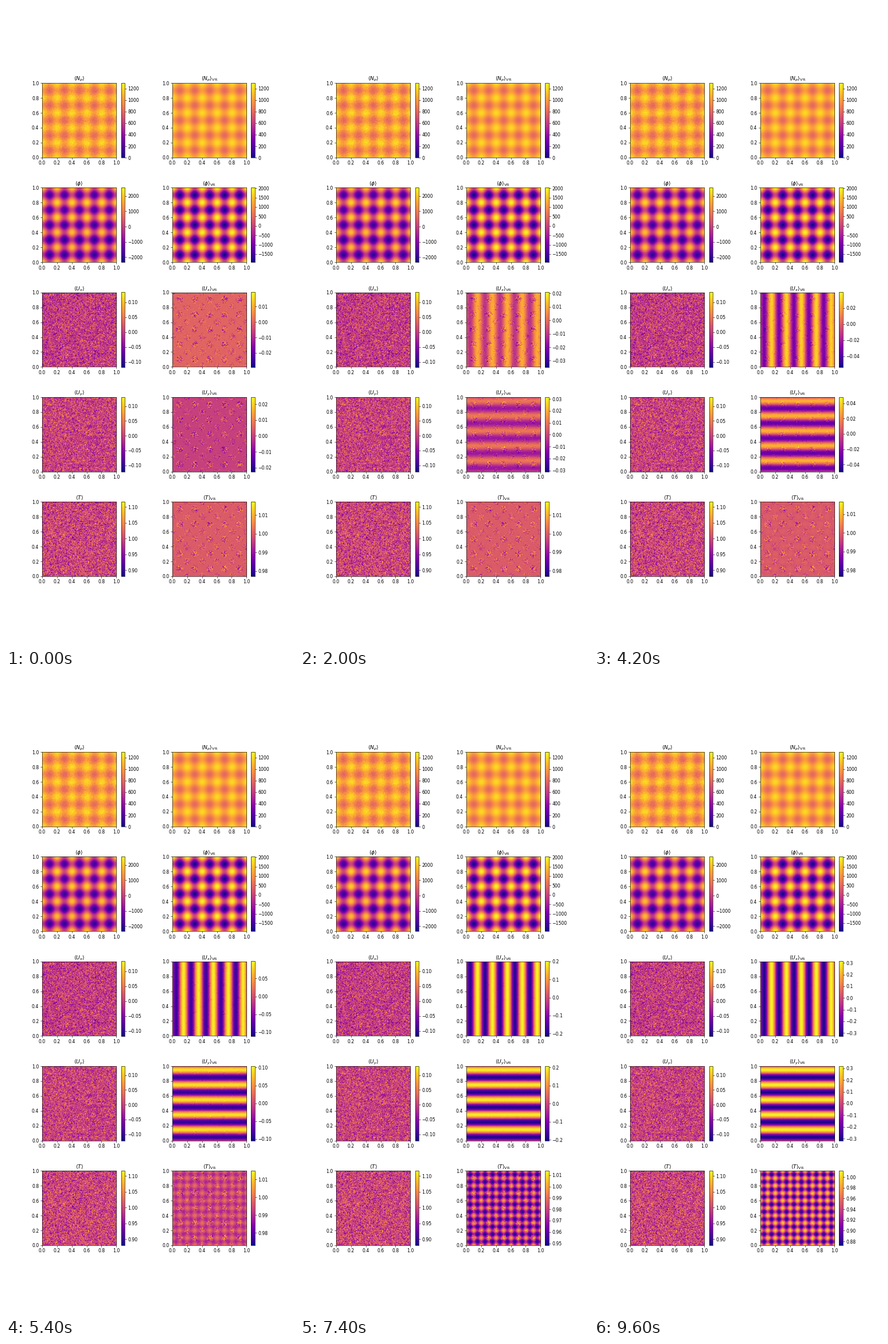
Recreate the animation shown at these times as a matplotlib script. Size 502 by 1116 pixels, loop 9.8 s.

```python
import numpy as np
import matplotlib.pyplot as plt
from matplotlib.animation import FuncAnimation

WIDTH, HEIGHT, DPI = 502, 1116, 55.8
FRAMES, INTERVAL = 49, 200
N = 100

plt.rcParams.update({"font.family": "DejaVu Sans", "font.size": 10})
rng = np.random.default_rng(7)

centres = (np.arange(N) + 0.5) / N
X, Y = np.meshgrid(centres, centres)
wave = np.cos(10 * np.pi * X) + np.cos(10 * np.pi * Y)
sin_x, sin_y = np.sin(10 * np.pi * X), np.sin(10 * np.pi * Y)
density = 1000 + 100 * wave


def noise():
    return rng.standard_normal((N, N))


def stretch(values, low, high):
    """Scale both tails so that the values span exactly low to high."""
    return np.where(values < 0, values * low / values.min(),
                    values * high / values.max())


def smoothstep(values, start, stop):
    u = np.clip((values - start) / (stop - start), 0, 1)
    return u * u * (3 - 2 * u)


def sim_time(i):
    """Fine steps first, ten times coarser ones later."""
    return 0.001 * i if i <= 20 else 0.02 + 0.01 * (i - 20)


# Variance-reduced noise gathers where density is far from its mean
spots = 0.06 + smoothstep(abs(wave) / 2, 0.3, 0.75) * np.where(wave < 0, 1, 0.6)


class PlainAverage:
    """Thermal noise whose cells change value one by one as time goes on."""

    def __init__(self, mean, low, high):
        self.early = mean + stretch(noise(), low, high)
        self.late = mean + 0.032 * noise()
        self.switch = rng.uniform(0.008, 3, (N, N))
        self.limits = mean + low, mean + high

    def __call__(self, t):
        return np.where(t > self.switch, self.late, self.early), self.limits


class ReducedAverage:
    """Mean flow plus fixed noise, with limits that follow the data."""

    def __init__(self, mean, low, high):
        self.mean = mean
        self.noise = stretch(spots * noise(), low, high)

    def __call__(self, t):
        data = self.mean(t) + self.noise
        return data, (data.min(), data.max())


def static(data, low, high):
    return lambda t: (data, (low, high))


def speed(t):
    return 1.04 * t


def temperature(t):
    return 1 - 2 / 3 * speed(t) ** 2 * (sin_x**2 + sin_y**2)


columns = [
    [
        static(density + np.sqrt(density) * noise(), 0, 1297),
        static(1000 * wave - 160 * np.sin(2 * np.pi * Y), -2336, 2547),
        PlainAverage(0, -0.1177, 0.1336),
        PlainAverage(0, -0.1220, 0.1310),
        PlainAverage(1, -0.1200, 0.1170),
    ],
    [
        static(density, 0, 1297),
        static(985 * wave + 45, -1942, 2031),
        ReducedAverage(lambda t: -speed(t) * sin_x, -0.0292, 0.0193),
        ReducedAverage(lambda t: -speed(t) * sin_y, -0.0227, 0.0246),
        ReducedAverage(temperature, -0.0230, 0.0172),
    ],
]
SYMBOLS = ["N_p", r"\phi", "U_x", "U_y", "T"]
SUFFIXES = ["", r"_\mathrm{VR}"]

# The small margin keeps the pixel size from rounding down
fig, axes = plt.subplots(
    5, 2, dpi=DPI, figsize=((WIDTH + 1e-6) / DPI, (HEIGHT + 1e-6) / DPI))
fig.subplots_adjust(left=0.125, right=0.9, bottom=0.11, top=0.88,
                    wspace=0.4, hspace=0.4)


def panel(ax, field, title):
    data, (low, high) = field(0)
    image = ax.imshow(data, origin="lower", extent=(0, 1, 0, 1), cmap="plasma",
                      vmin=low, vmax=high)
    ax.set_title(title)
    fig.colorbar(image, ax=ax)
    return image


moving = []
for col, (fields, suffix) in enumerate(zip(columns, SUFFIXES)):
    for row, (field, symbol) in enumerate(zip(fields, SYMBOLS)):
        title = rf"$\langle {symbol} \rangle{suffix}$"
        image = panel(axes[row, col], field, title)
        if row >= 2:
            moving.append((image, field))


def update(i):
    t = sim_time(i)
    for image, field in moving:
        data, limits = field(t)
        image.set_data(data)
        image.set_clim(*limits)
    return [image for image, _ in moving]


anim = FuncAnimation(fig, update, frames=FRAMES, interval=INTERVAL,
                     repeat=True, repeat_delay=0, blit=False)
plt.show()
```
